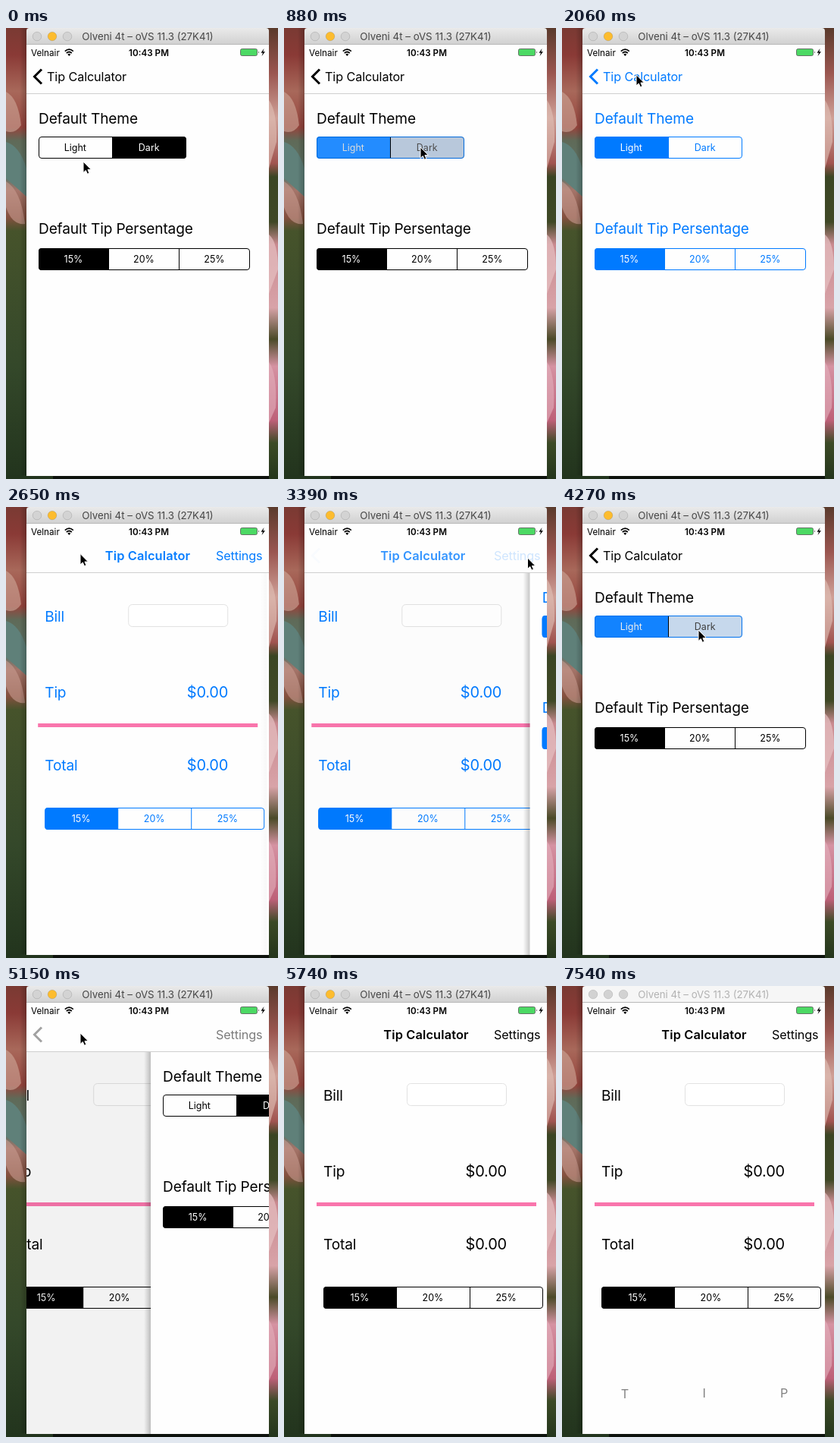
Recreate the animation shown at these times as an HTML page. Size 359 by 594 pixels, loop 7640 ms.

```html
<!DOCTYPE html>
<html lang="en">
<head>
<meta charset="utf-8">
<title>Tip Calculator</title>
<style>
html, body { margin: 0; width: 100%; height: 100%; overflow: hidden; background: #26391f; }
svg { display: block; width: 100vw; height: 100vh; font-family: Inter, Roboto, sans-serif; }
.big { font-size: 19.1px; letter-spacing: -.15px; }
.sum { font-size: 20px; letter-spacing: -.2px; text-anchor: end; }
.nav { font-size: 16.2px; letter-spacing: -.1px; }
.head { font-size: 16.4px; font-weight: 600; letter-spacing: .12px; }
.mid { text-anchor: middle; }
.small { font-size: 12.5px; text-anchor: middle; }
.bar { font-size: 11.7px; fill: #000; }
</style>
</head>
<body>
<svg viewBox="0 0 359 594" preserveAspectRatio="none">
  <defs>
    <linearGradient id="wallL" x2="0" y2="1">
      <stop offset="0" stop-color="#7a3a33"/><stop offset=".06" stop-color="#8a3a36"/>
      <stop offset=".14" stop-color="#a8685a"/><stop offset=".22" stop-color="#96443d"/>
      <stop offset=".25" stop-color="#5f6a58"/><stop offset=".33" stop-color="#5d7468"/>
      <stop offset=".36" stop-color="#a5756a"/><stop offset=".42" stop-color="#84503f"/>
      <stop offset=".45" stop-color="#46532b"/><stop offset=".75" stop-color="#34482a"/>
      <stop offset="1" stop-color="#22341d"/>
    </linearGradient>
    <linearGradient id="wallR" x2="0" y2="1">
      <stop offset="0" stop-color="#5a3a2c"/><stop offset=".1" stop-color="#9a5650"/>
      <stop offset=".2" stop-color="#cfa097"/><stop offset=".3" stop-color="#a05450"/>
      <stop offset=".33" stop-color="#3a4524"/><stop offset=".43" stop-color="#3f4826"/>
      <stop offset=".48" stop-color="#c98a90"/><stop offset=".62" stop-color="#d8a3a8"/>
      <stop offset=".69" stop-color="#4a4a28"/><stop offset=".75" stop-color="#d592a2"/>
      <stop offset=".87" stop-color="#bd6078"/><stop offset=".92" stop-color="#3b4a26"/>
      <stop offset="1" stop-color="#24351c"/>
    </linearGradient>
    <linearGradient id="chrome" x2="0" y2="1">
      <stop offset="0" stop-color="#eaeaea"/><stop offset="1" stop-color="#d0d0d0"/>
    </linearGradient>
    <linearGradient id="edge">
      <stop offset="0" stop-opacity="0"/><stop offset="1" stop-opacity=".22"/>
    </linearGradient>
    <clipPath id="win"><rect x="27" y="22" width="320" height="568"/></clipPath>
    <clipPath id="body"><rect x="27" y="87" width="320" height="503"/></clipPath>
  </defs>

  <rect width="30" height="594" fill="url(#wallL)"/>
  <path d="M0 150Q18 155 27 185V222Q8 205 0 198Z" fill="#5f8079"/>
  <path d="M0 84Q16 92 20 128Q12 140 0 136Z" fill="#cfa89a" opacity=".6"/>
  <path d="M0 202Q20 214 25 258Q8 260 0 236Z" fill="#c99c90" opacity=".6"/>
  <rect x="345" width="14" height="594" fill="url(#wallR)"/>
  <path d="M347 95Q358 110 357 150L347 185Z" fill="#e2c2b8" opacity=".6"/>
  <path d="M347 272Q359 282 359 318L347 350Z" fill="#e6c0c2" opacity=".7"/>
  <path d="M347 440Q358 455 356 500L347 520Z" fill="#e3b0bc" opacity=".6"/>
  <rect x="18" width="9" height="594" fill="url(#edge)"/>
  <rect x="27" y="589" width="320" height="5" fill="#0d120c"/>
  <rect y="589" width="62" height="5" fill="#22341d"/>

  <g id="screen">
    <rect x="27" y="22" width="320" height="568" fill="#fefefe"/>
    <g clip-path="url(#body)">
      <g id="main" fill="currentColor">
        <g class="big">
          <text x="52" y="150.500">Bill</text>
          <text x="52" y="250.500">Tip</text>
          <text x="52" y="346.500">Total</text>
        </g>
        <rect x="162.500" y="128.500" width="131" height="29" rx="5" fill="#fff" stroke="#e2e2e2"/>
        <text class="sum" x="294" y="250.500">$0.00</text>
        <text class="sum" x="294" y="346.500">$0.00</text>
        <rect x="43" y="285" width="290" height="5" fill="#f975ac"/>
        <g id="letters" class="nav mid">
          <text x="83" y="543">T</text><text x="187.500" y="542">I</text><text x="293" y="542">P</text>
        </g>
      </g>
      <rect id="dim" x="27" y="87" width="320" height="503"/>
      <g id="page" fill="currentColor">
        <rect id="shade" x="18" y="87" width="9" height="503" fill="url(#edge)"/>
        <rect x="27" y="87" width="320" height="503" fill="#fefefe"/>
        <text class="big" x="43" y="125.500">Default Theme</text>
        <text class="big" x="43" y="270.500">Default Tip Persentage</text>
      </g>
    </g>
    <rect x="27" y="86" width="320" height="1" fill="#cfcfcf"/>
    <g class="nav" fill="currentColor">
      <path id="chevron" d="M47 54.500L37.500 64L47 73.500" fill="none" stroke="currentColor" stroke-width="3"/>
      <text id="back" y="70">Tip Calculator</text>
      <text id="title" class="head mid" y="70">Tip Calculator</text>
      <text id="settings" x="338.500" y="70" text-anchor="end">Settings</text>
    </g>
    <g class="bar">
      <text x="33" y="36.500">Velnair</text>
      <text class="mid" x="188.500" y="36.500" font-weight="600">10:43 PM</text>
      <g fill="none" stroke="#000" stroke-width="1.700">
        <path d="M77.800 30.600Q83.300 25.800 88.800 30.600M79.800 33Q83.300 30 86.800 33"/>
      </g>
      <path d="M81.300 34.700Q83.300 33 85.300 34.700L83.300 37Z"/>
      <rect x="309.500" y="27.500" width="22" height="9" rx="2" fill="#4cd964" stroke="#555" stroke-width=".8"/>
      <path d="M333 30.500Q334.500 32 333 33.500Z"/>
      <path d="M340.500 27L336.500 32.700H339L337.500 37L342 31.200H339.300Z"/>
    </g>
  </g>

  <path d="M27 22V4Q27 0 31 0H343Q347 0 347 4V22Z" id="chromeBar"/>
  <rect x="27" y="21" width="320" height="1" fill="#b9b9b9"/>
  <g id="dots" stroke="#000" stroke-opacity=".12">
    <circle cx="41" cy="11" r="5.800"/><circle cx="61" cy="11" r="5.800"/><circle cx="81" cy="11" r="5.800"/>
  </g>
  <text id="caption" class="mid" x="187" y="15.800" font-size="13.300">Olveni 4t – oVS 11.3 (27K41)</text>
  <path id="cursor" d="M0 0V14.500L3.300 11.500L5.400 16.200L7.900 15.200L5.900 10.600H10.400Z" stroke="#fff" stroke-width="1"/>
</svg>
<script>
const LOOP = 7640, STEP = 147.3;
const $ = id => document.getElementById(id);
const set = (el, o) => { for (const k in o) el.setAttribute(k, o[k]); };
const add = (parent, tag, o) => {
  const el = document.createElementNS('http://www.w3.org/2000/svg', tag);
  set(el, o);
  return parent.appendChild(el);
};
const clamp = v => Math.max(0, Math.min(1, v));
const mix = (a, b, p) => a.map((v, i) => v + (b[i] - v) * p);
const rgb = c => `rgb(${c.map(Math.round)})`;
const BLUE = [0, 122, 255], BLACK = [0, 0, 0], WHITE = [254, 254, 254];

set($('screen'), { 'clip-path': 'url(#win)' });

// Segmented control; returns paint(fills, textColours, outline, divider)
function segments(parent, x, y, w, labels) {
  const g = add(parent, 'g', {}), cell = w / labels.length, last = labels.length - 1;
  const boxes = labels.map((_, i) => {
    const l = x + i * cell, r = l + cell, b = y + 29;
    const d = i === 0 ? `M${r} ${y}H${l + 4}Q${l} ${y} ${l} ${y + 4}V${b - 4}Q${l} ${b} ${l + 4} ${b}H${r}Z`
      : i === last ? `M${l} ${y}H${r - 4}Q${r} ${y} ${r} ${y + 4}V${b - 4}Q${r} ${b} ${r - 4} ${b}H${l}Z`
      : `M${l} ${y}H${r}V${b}H${l}Z`;
    return add(g, 'path', { d });
  });
  const bars = labels.slice(1).map((_, i) =>
    add(g, 'rect', { x: Math.ceil(x + (i + 1) * cell) - 1, y, width: 1, height: 29 }));
  const frame = add(g, 'rect', { x: x + .5, y: y + .5, width: w - 1, height: 28, rx: 3.5, fill: 'none' });
  const texts = labels.map((s, i) => {
    const el = add(g, 'text', { class: 'small', x: x + (i + .5) * cell - .5, y: y + 19 });
    el.textContent = s;
    return el;
  });
  return (fills, inks, line, bar) => {
    boxes.forEach((el, i) => set(el, { fill: rgb(fills[i]) }));
    texts.forEach((el, i) => set(el, { fill: rgb(inks[i]) }));
    bars.forEach(el => set(el, { fill: rgb(bar) }));
    set(frame, { stroke: rgb(line) });
  };
}
const rates = ['15%', '20%', '25%'];
const themeSeg = segments($('page'), 43, 143, 195, ['Light', 'Dark']);
const rateSegs = [segments($('page'), 43, 290, 279, rates), segments($('main'), 52, 396, 290, rates)];

// Taps on the theme control: time, chosen segment
const taps = [[-999, 1], [130, 0], [835, 1], [1400, 0], [4247, 1]];
const tint = i => i ? BLACK : BLUE;

function paintTheme(t) {
  const [start, now] = taps.filter(a => a[0] <= t).pop();
  const p = clamp((t - start) / 350), c = tint(now), old = tint(1 - now);
  const fills = [], inks = [];
  fills[now] = mix(mix(old, WHITE, .84), c, p);
  inks[now] = mix(c, WHITE, .2 + .8 * p);
  fills[1 - now] = mix(old, WHITE, p);
  inks[1 - now] = mix(WHITE, c, p);
  themeSeg(fills, inks, mix(old, c, p), c);
  rateSegs.forEach(paint => paint([c, WHITE, WHITE], [WHITE, c, c], c, c));
  $('screen').style.color = rgb(c);
}

// Critically damped slide used by both page changes
const spring = ms => {
  if (ms <= 0) return 0;
  const x = ms * .018;
  return ms > 640 ? 1 : 1 - Math.exp(-x) * (1 + x);
};

function paintPages(t) {
  const pushing = t >= 3364 && t < 5060;
  const s = t < 3364 ? 1 - spring(t - 2270) : pushing ? spring(t - 3364) : 1 - spring(t - 5060);
  set($('main'), { transform: `translate(${-96 * s})` });
  set($('page'), { transform: `translate(${320 * (1 - s)})`, visibility: s ? 'visible' : 'hidden' });
  set($('shade'), { opacity: clamp(s * 15) });
  set($('dim'), { opacity: .1 * s });
  set($('chevron'), { opacity: s ** 1.4 });
  set($('back'), { x: 54 + 78 * (1 - s), opacity: clamp(2 * s - 1) });
  set($('title'), { x: 187.5 - 60 * s, opacity: clamp(1 - 3 * s) });
  set($('settings'), { opacity: (pushing ? .2 : 1) * (1 - s) });
}

// Pointer stops: time, x, y
const path = [
  [0, 102, 176], [147, 93, 159], [300, 93, 159], [585, 180, 157], [1180, 180, 157],
  [1400, 93, 159], [1640, 93, 159], [1910, 98, 71], [2058, 98, 61.5], [2660, 98, 61.5],
  [2950, 205, 29], [3240, 321.5, 67], [3540, 321.5, 67], [3975, 180, 162],
  [4430, 180, 162], [4860, 98, 62], [5310, 98, 62], [5595, 332, 110], [LOOP, 332, 110]
];
function paintCursor(t) {
  const i = path.findIndex(a => a[0] > t), a = path[i - 1], b = path[i];
  const u = (t - a[0]) / (b[0] - a[0]), e = u * u * (3 - 2 * u);
  const [, x, y] = mix(a, b, e);
  set($('cursor'), { transform: `translate(${x} ${y})`, visibility: t < 5730 ? 'visible' : 'hidden' });
}

function paintWindow(t) {
  const idle = t > 6760;
  set($('chromeBar'), { fill: idle ? '#f6f6f6' : 'url(#chrome)' });
  set($('caption'), { fill: idle ? '#b2b2b2' : '#474747' });
  [...$('dots').children].forEach((el, i) =>
    set(el, { fill: idle ? '#d2d2d2' : i === 1 ? '#fdbc2e' : '#d3d3d3' }));
  set($('letters'), { opacity: clamp((t - 6740) / 1600) });
}

function draw() {
  // The picture advances in even steps
  const t = Math.floor((performance.now() % LOOP + 9) / STEP) * STEP;
  paintTheme(t);
  paintPages(t);
  paintCursor(t);
  paintWindow(t);
  requestAnimationFrame(draw);
}
draw();
</script>
</body>
</html>
```
